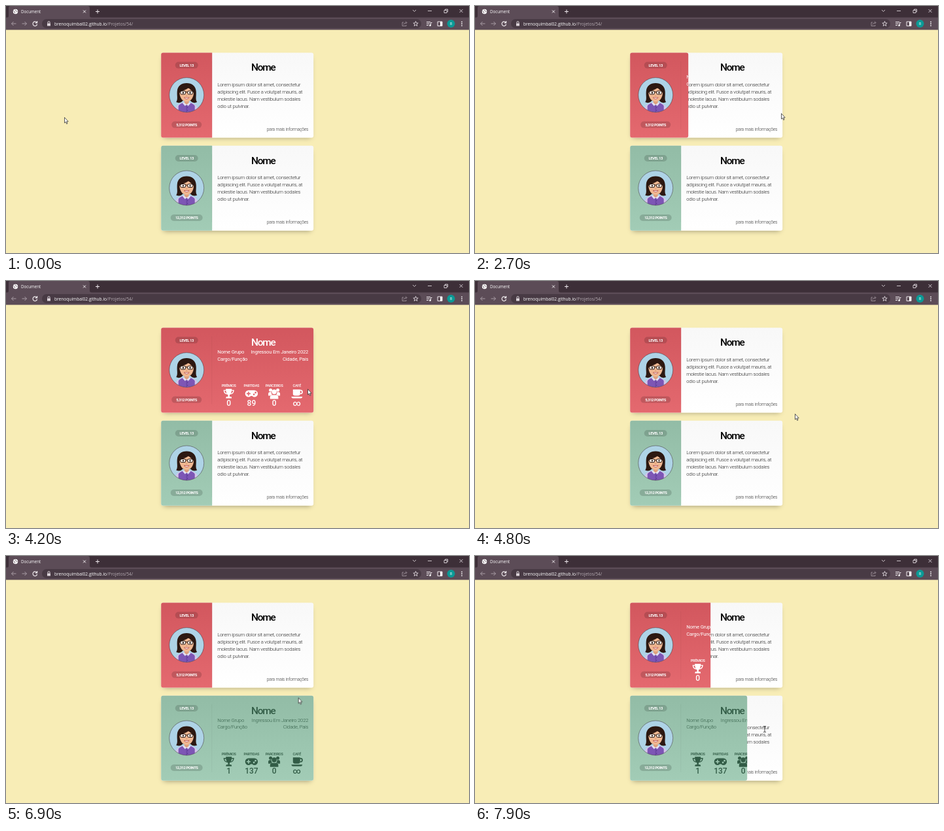
Recreate the animation shown at these times as an HTML page. Size 708 by 378 pixels, loop 8000 ms.

```html
<!DOCTYPE html>
<html lang="pt">
<head>
<meta charset="utf-8">
<title>Document</title>
<style>
html, body { margin: 0; width: 100%; height: 100%; overflow: hidden; }
#stage { position: relative; width: 708px; height: 378px; overflow: hidden; background: #f8edb6; }
svg { position: absolute; left: 0; top: 0; display: block; }

.ui { font: 6.2px "Open Sans", "Noto Sans", sans-serif; fill: #fff; }
.line { fill: none; stroke: #eee8ec; }
.dim { stroke: #a99da5; }

.card {
  position: absolute; left: 0; top: 0; width: 233.4px; height: 130px; border-radius: 3px;
  background: linear-gradient(#f8f8f8, #fff);
  box-shadow: 0 4px 8px -4px rgba(0, 0, 0, .4);
  font: 300 7.7px Roboto, "Liberation Sans", Arial, sans-serif; letter-spacing: -.03em;
}
.panel { position: absolute; left: 0; top: 0; height: 130px; overflow: hidden; border-radius: 3px 0 0 3px; }
.red { transform: translate(237.2px, 71.4px); color: #fff; }
.green { transform: translate(237.2px, 213.8px); color: #325c46; }
.red .panel { background: linear-gradient(#d2575e, #e4696f); }
.green .panel { background: linear-gradient(#92bca6, #a2ccb6); }
.panel svg { fill: currentColor; }
.red .panel { font-weight: 400; }
.body { fill: #222; }
.name { font-size: 15.4px; font-weight: 500; letter-spacing: -.08em; text-anchor: middle; }
.body .name { fill: #000; }
.more { font-size: 6.75px; fill: #333; }
.end { text-anchor: end; }
.pill { font-size: 5.9px; font-weight: 700; letter-spacing: -.08em; text-anchor: middle; fill: #fff; }
.pill rect { fill: #000; opacity: .15; }
.stat { text-anchor: middle; font-weight: 500; }
.label { font-size: 5.6px; letter-spacing: -.05em; }
.value { font-size: 12px; letter-spacing: 0; }

/* Scrubbed by --t; the 10 s scale makes 1% equal 100 ms. */
.panel, .cursor, .arrow, .beam {
  animation: 10s linear calc(var(--t, 0) * -1ms) both paused;
}
.red .panel { animation-name: red, red-corners; animation-timing-function: ease, step-end; }
.green .panel { animation-name: green, green-corners; animation-timing-function: ease, step-end; }
.cursor { animation-name: move; }
.arrow { animation-name: arrow; animation-timing-function: step-end; }
.beam { animation-name: beam; animation-timing-function: step-end; }

@keyframes red {
  0%, 26.67%, 48.24%, 69.66%, 81.33%, 100% { width: 77.8px; }
  30.67%, 44.24%, 73.66%, 77.33% { width: 233.4px; }
}
@keyframes green {
  0%, 51.5%, 73.66%, 77.49%, 100% { width: 77.8px; }
  55.5%, 69.66%, 81.49% { width: 233.4px; }
}
@keyframes red-corners {
  0%, 44.24%, 77.33%, 100% { border-radius: 3px 0 0 3px; }
  26.67%, 69.66% { border-radius: 3px; }
}
@keyframes green-corners {
  0%, 69.66%, 100% { border-radius: 3px 0 0 3px; }
  51.5%, 77.49% { border-radius: 3px; }
}
@keyframes move {
  0% { transform: translate(89px, 170px); }
  2%, 8.9% { transform: translate(594px, 149px); }
  9%, 10.9% { transform: translate(594px, 149.5px); }
  13%, 22% { transform: translate(594px, 152px); }
  24%, 25% { transform: translate(528px, 178px); }
  27%, 37% { transform: translate(468px, 164px); }
  42% { transform: translate(461px, 165px); }
  44.2% { transform: translate(470px, 174px); }
  46% { transform: translate(489px, 190px); }
  48% { transform: translate(489px, 203px); }
  51.5% { transform: translate(470px, 222px); }
  55%, 66% { transform: translate(450px, 234px); }
  69.6% { transform: translate(446px, 213px); }
  72% { transform: translate(443px, 148px); }
  75%, 76% { transform: translate(444px, 150px); }
  77% { transform: translate(444px, 185px); }
  78% { transform: translate(443px, 232px); }
  79%, 100% { transform: translate(443px, 265px); }
}
@keyframes arrow { 0% { opacity: 1; } 79%, 100% { opacity: 0; } }
@keyframes beam { 0% { opacity: 0; } 79%, 100% { opacity: 1; } }
</style>
</head>
<body>
<div id="stage">
  <svg width="708" height="378">
    <defs>
      <clipPath id="round"><circle r="26.5"/></clipPath>
      <g id="avatar">
        <g clip-path="url(#round)">
          <circle r="27" fill="#aed3e6"/>
          <path fill="#2c1811" d="M-16 11C-13 7-15 2-14.500-5C-14-14-8-18 0-18S14-14 14.500-5C15 2 13 7 16 11C12 13 8 12 6 9H-6C-8 12-12 13-16 11Z"/>
          <path fill="#d3c4ea" d="M-18 28C-18 19-15 14-6 12H6C15 14 18 19 18 28Z"/>
          <path fill="#7d56b5" d="M-12.500 28V17Q-11 14-6 12.500L0 15.500 6 12.500Q11 14 12.500 17V28Z"/>
          <path fill="#e3e0f0" d="M-4.500 11.500H4.500L6 13 2.500 17 0 15-2.500 17-6 13Z"/>
          <path fill="#dda07c" d="M-3.500 7H3.500V12L0 15-3.500 12Z"/>
          <path fill="#f0b892" d="M-11-5C-11-12 11-12 11-5C11 4 6.500 10.500 0 10.500S-11 4-11-5Z"/>
          <path fill="#2c1811" d="M-12-1C-11-6-3-6 3-11C5-8 10-6 12-1C14-12 7-17 0-17S-14-12-12-1Z"/>
          <g fill="#fff" fill-opacity=".75" stroke="#21140f">
            <rect x="-9.500" y="-6" width="8" height="5" rx="1.800"/>
            <rect x="1.500" y="-6" width="8" height="5" rx="1.800"/>
            <path d="M-1.500-4.500H1.500"/>
          </g>
          <g fill="#21140f"><circle cx="-5.300" cy="-3.400" r="1.200"/><circle cx="5.300" cy="-3.400" r="1.200"/></g>
          <path fill="none" stroke="#d18e6a" d="M-1 1Q0 2 1 1"/>
          <path fill="#fff" stroke="#b9453f" stroke-width=".8" d="M-4 4H4Q0 8.500-4 4Z"/>
          <path stroke="#5b3a92" stroke-width=".7" d="M0 16V27"/>
          <g fill="#4b2d80"><circle cx="1.500" cy="19.500" r=".7"/><circle cx="1.500" cy="23.500" r=".7"/></g>
        </g>
        <circle r="26.500" fill="none" stroke="#3a2c34" stroke-opacity=".5"/>
      </g>
      <g id="trophy">
        <path d="M-4.500-7.500H4.500C4.500-2 3 1 1.200 2V4.500H3.500Q4.500 5 4.500 7H-4.500Q-4.500 5-3.500 4.500H-1.200V2C-3 1-4.500-2-4.500-7.500Z"/>
        <path fill="none" stroke="currentColor" stroke-width="1.400" d="M-4-5H-7.300Q-7 0-2.500.5M4-5H7.300Q7 0 2.500.5"/>
      </g>
      <path id="pad" fill-rule="evenodd" d="M-4.500-5.200H4.500A5.200 5.200 0 0 1 4.500 5.200Q2.500 5.200 1.200 3.600H-1.200Q-2.500 5.200-4.500 5.200A5.200 5.200 0 0 1-4.500-5.200ZM-5.300-3V-.8H-7.500V.8H-5.300V3H-3.700V.8H-1.500V-.8H-3.700V-3ZM2.500 0V2.400H4.900V0ZM5-2.800V-.4H7.400V-2.800Z"/>
      <g id="group">
        <circle cx="-5.500" cy="-5.500" r="2.500"/><circle cx="5.500" cy="-5.500" r="2.500"/><circle cy="-2.800" r="3.700"/>
        <path d="M-9 3V0Q-9-2.500-6.500-2.500H-4.500Q-4.500.5-2.800 1.500-5 1.500-6 3ZM9 3V0Q9-2.500 6.500-2.500H4.500Q4.500.5 2.800 1.500 5 1.500 6 3ZM-6.300 8V5.500Q-6.300 2-3 2H3Q6.300 2 6.300 5.500V8Z"/>
      </g>
      <g id="cup">
        <path d="M-6-6.500H5V0Q5 3 2 3H-3Q-6 3-6 0ZM-8.500 4.500H8.500Q8 7 6 7H-6Q-8 7-8.500 4.500Z"/>
        <path fill="none" stroke="currentColor" stroke-width="1.700" d="M5-5H6Q8.200-5 8.200-2.500T6 0H5"/>
      </g>
    </defs>

    <g class="ui">
      <path fill="#3d2f38" d="M0 0H708V18H0Z"/>
      <path fill="#5c4c57" d="M0 17.500H2Q4 17.500 4 15V3Q4 0 7 0H125Q128 0 128 3V15Q128 17.500 131 17.500H708V36.500H0Z"/>
      <rect x="55" y="20" width="580" height="14" rx="7" fill="#483a44"/>

      <circle cx="14.500" cy="8.500" r="3.700"/>
      <path fill="none" stroke="#5c4c57" stroke-width=".8" d="M11.500 7.500Q14 8 13.500 11M14 5.500Q14.500 8 17.500 8.500"/>
      <text x="23" y="11">Document</text>
      <path class="line" d="M118 6.500 122 10.500M122 6.500 118 10.500M137 8.500H143M140 5.500V11.500"/>
      <path class="line" stroke-width=".8" d="M622 6 624.500 8.500 627 6M645 7.500H651M693.500 5 698.500 10M698.500 5 693.500 10M670 6.500H674V10.500H670ZM671.500 6V5H675.500V9H674.500"/>

      <path class="line dim" d="M15.500 27H8.500M11.500 24 8.500 27 11.500 30M24.500 27H31.500M28.500 24 31.500 27 28.500 30"/>
      <path class="line" stroke-width="1.200" d="M47 25.200A3.300 3.300 0 1 0 47.600 28M47.600 23V25.800H44.800"/>
      <path fill="#ddd5da" d="M63 26.500H68V30.500H63Z"/>
      <path class="line" stroke-width=".9" d="M64 26.500V25A1.500 1.500 0 0 1 67 25V26.500"/>
      <text x="74" y="29.700" style="font-size:6.600px">brenoquimbal02.github.io<tspan fill="#b5abb2">/Projetos/54/</tspan></text>
      <path class="line dim" stroke-width=".8" d="M608 25H606V30.500H612V29M608 28.500Q608.500 25.500 612.500 25.500M611 23.500 613 25.500 611 27.500"/>
      <path class="line" stroke-width=".8" d="M626.500 23.300 627.500 26 630.200 26.100 628 27.800 628.800 30.500 626.500 29 624.200 30.500 625 27.800 622.800 26.100 625.500 26Z"/>
      <path class="line" d="M643 24.500H649M643 27H648M643 29.500H646M649.500 30V25.500H651.500"/>
      <circle cx="648.500" cy="29.800" r="1.300"/>
      <path class="line" d="M660 24H667V30.500H660Z"/>
      <path d="M664 24H667V30.500H664Z"/>
      <circle cx="680.500" cy="27" r="6" fill="#0b9a96"/>
      <text x="680.500" y="29" text-anchor="middle" style="font-size:5.500px">B</text>
      <circle cx="697" cy="24.300" r=".9"/><circle cx="697" cy="27.200" r=".9"/><circle cx="697" cy="30.100" r=".9"/>
    </g>
  </svg>

  <div id="cards"></div>

  <svg width="708" height="378">
    <g class="cursor">
      <path class="arrow" fill="#fff" stroke="#333" stroke-width=".8" d="M.5.5V9L2.400 7.300 3.700 10.400 5 9.800 3.700 6.800H6.200Z"/>
      <path class="beam" fill="none" stroke="#333" stroke-width=".9" d="M-2-4.500H-.7L0-4 .7-4.500H2M0-4V4M-2 4.500H-.7L0 4 .7 4.500H2"/>
    </g>
  </svg>
</div>
<script>
const LABELS = ["PRÊMIOS", "PARTIDAS", "PARCEIROS", "CAFÉ"];
const ICONS = ["trophy", "pad", "group", "cup"];
const LOREM = [
  "Lorem ipsum dolor sit amet, consectetur",
  "adipiscing elit. Fusce a volutpat mauris, at",
  "molestie lacus. Nam vestibulum sodales",
  "odio ut pulvinar."
];

const text = (x, y, str, cls = "") => `<text x="${x}" y="${y}" class="${cls}">${str}</text>`;
const svg = (cls, inner) => `<svg class="${cls}" width="234" height="130">${inner}</svg>`;

const pill = (y, w, str) =>
  `<g class="pill"><rect x="${39 - w / 2}" y="${y - 5}" width="${w}" height="10" rx="5"/>${text(39, y + 2.1, str)}</g>`;

const stat = (value, i) => {
  const x = 103.5 + i * 34.7;
  return `<g class="stat">${text(x, 90.8, LABELS[i], "label")}
    <use href="#${ICONS[i]}" x="${x}" y="101"/>${text(x, 119.2, value, "value")}</g>`;
};

function card(cls, points, width, values) {
  const body = text(156, 28, "Nome", "name")
    + LOREM.map((row, i) => text(86, 51.5 + i * 10.9, row)).join("")
    + text(225, 119.5, "para mais informações", "more end");
  const panel = pill(19.2, 35, "LEVEL 13")
    + `<use href="#avatar" x="39" y="64.7"/>`
    + pill(110.2, width, points + " POINTS")
    + `<path fill="#000" opacity=".04" d="M77 13H78V117H77Z"/>`
    + text(156, 28, "Nome", "name")
    + text(86, 39.8, "Nome Grupo") + text(225, 39.8, "Ingressou Em Janeiro 2022", "end")
    + text(86, 50.6, "Cargo/Função") + text(225, 50.6, "Cidade, País", "end")
    + values.map(stat).join("");
  return `<div class="card ${cls}">${svg("body", body)}<div class="panel">${svg("", panel)}</div></div>`;
}

document.getElementById("cards").innerHTML =
  card("red", "5,312", 46, [0, 89, 0, "∞"]) + card("green", "12,312", 49, [1, 137, 0, "∞"]);

const stage = document.getElementById("stage");
function tick() {
  const t = performance.now() % 8000;
  stage.style.setProperty("--t", Math.floor(t / 100) * 100);
  requestAnimationFrame(tick);
}
tick();
</script>
</body>
</html>
```
